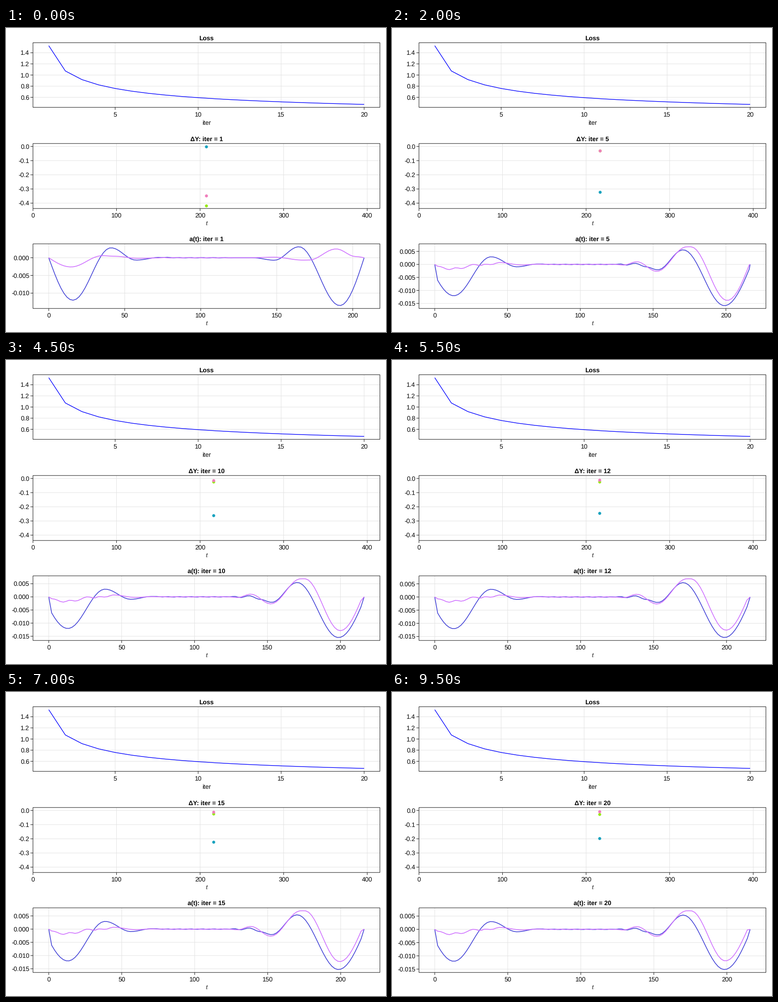
Write a matplotlib script that moves like this. It is 837 px wide and 669 px high and loops after 10 s.

```python
import numpy as np
import matplotlib.pyplot as plt
from matplotlib.animation import FuncAnimation

W, H, DPI = 837, 669, 64
PX = 72 / DPI                      # points per pixel
LEFT, RIGHT, MID = 59.4, 823.6, 441.5
SPAN = 694.6                       # width of a control curve on the stage
FONT = 13.9
ITERS = np.arange(1, 21)
BLUE, VIOLET = "#4848d8", "#d074ff"
TEAL, PINK, GREEN = "#18a2be", "#f07fbc", "#98e818"

plt.rcParams["font.family"] = ["Liberation Sans", "DejaVu Sans"]
plt.rcParams["mathtext.fontset"] = "cm"
plt.rcParams["text.hinting"] = "none"
plt.rcParams["path.snap"] = False

LOSS = np.where(ITERS == 1, 1.527, 0.143 + 1.2704 * ITERS ** -0.45)


def progress(k):
    """0 at iteration 5, 1 at iteration 20, slowing down like a logarithm."""
    w = np.log(k / 5) / np.log(4)
    return w if w > 0 else 0.4 * w


def duration(k):
    return 207.5 if k == 1 else 216.65 - 0.72 * progress(k)


def errors(k):
    """Coloured end-point errors, back to front."""
    if k == 1:
        teal, green, pink = 0, -.417, -.346
    else:
        teal = -.322 + .0895 * np.log(k / 5)
        green = -.013 - .0007 * k - .0125 * np.exp((5 - k) / 3)
        pink = -.0085 - .0205 * np.exp((5 - k) / 3.7)
    return (TEAL, teal), (GREEN, green), (PINK, pink)


def swing(x, keys, start=0, end=SPAN):
    """Cosine easing from extreme to extreme, crossing zero at start and end."""
    (x0, v0), (x1, v1) = keys[0], keys[-1]
    keys = [(2 * start - x0, -v0), *keys, (2 * end - x1, -v1)]
    kx, kv = np.array(keys, float).T
    i = np.clip(np.searchsorted(kx, x, side="right") - 1, 0, len(kx) - 2)
    s = (x - kx[i]) / (kx[i + 1] - kx[i])
    v = kv[i] + (kv[i + 1] - kv[i]) * (1 - np.cos(np.pi * s)) / 2
    v[x > end] = 0
    v[0] = v[-1] = 0
    return v


def ripple(x, size, phase):
    window = np.clip((x - 225) / 30, 0, 1) * np.clip((410 - x) / 30, 0, 1)
    return size * window * np.sin(2 * np.pi * x / 25.5 + phase)


def first_controls(x):
    blue = swing(x, [(53, -12), (137, 2.81), (192, -.67), (245, .1), (290, 0),
                     (450, 0), (497, -.7), (551, 3.11), (641, -13.52)])
    violet = swing(x, [(49, -2.6), (118, .58), (146, .42), (196, -.16), (256, 0),
                       (440, 0), (496, .16), (560, -.67), (573, -.65),
                       (633, 2.49), (676, .33)])
    return blue + ripple(x, .05, 0), violet + ripple(x, .06, 2)


def later_controls(x, w):
    blue = swing(x, [(42, -12.05), (124, 2.93), (181, -.93), (226, .15), (260, 0),
                     (395, 0), (409, .18), (422, -.28), (441, .45), (465, -.93),
                     (491, -2.09), (547, 5.6 - .22 * w), (638, -15.86 + .7 * w)],
                 start=-11.8, end=697)
    violet = swing(x, [(10, -.82), (32, -2), (47, -1.26), (58, -1.6), (86, .02),
                       (100, -.46), (111, .1), (124, -.08), (142, .72), (192, -.22),
                       (226, .08), (260, 0), (395, 0), (416, -.25), (445, 1.03),
                       (489, -2.67), (555, 6.77 + .22 * w), (564, 6.77 + .22 * w),
                       (644 - 4 * w, -13.85 + 1.95 * w)],
                   end=693 - 4 * w)
    return blue + ripple(x, .09, 0), violet + ripple(x, .09, 2.5)


def controls(k):
    """Sample times and the two control curves of one iteration."""
    end = duration(k)
    t = np.append(np.arange(0, end - 0.3, 2), end)
    x = t / end * SPAN
    curves = first_controls(x) if k == 1 else later_controls(x, progress(k))
    return t, [c / 1000 for c in curves]


def padded(*arrays):
    lo, hi = min(map(np.min, arrays)), max(map(np.max, arrays))
    pad = 0.05 * (hi - lo)
    return lo - pad, hi + pad


class Panel:
    """A framed plot area placed by pixels."""

    def __init__(self, top, bottom, xlim, ylim):
        self.top, self.bottom, self.xlim, self.ylim = top, bottom, xlim, ylim

    def x(self, v):
        a, b = self.xlim
        return LEFT + (np.asarray(v) - a) / (b - a) * (RIGHT - LEFT)

    def y(self, v):
        a, b = self.ylim
        return self.bottom - (np.asarray(v) - a) / (b - a) * (self.bottom - self.top)

    def frame(self, title):
        line([LEFT, RIGHT, RIGHT, LEFT, LEFT],
             [self.top, self.top, self.bottom, self.bottom, self.top], "#111111", 1, z=4)
        text(MID, self.top - 5.8, title, weight="bold")

    def xticks(self, values):
        for v in values:
            x = float(self.x(v))
            line([x, x], [self.top, self.bottom], "#e2e2e2", 1, z=1)
            line([x, x], [self.bottom, self.bottom + 5.5], "#111111", 1, z=4)
            text(x, self.bottom + 20.1, f"{v}")

    def yticks(self, values, digits):
        for v in values:
            y = float(self.y(v))
            line([LEFT, RIGHT], [y, y], "#e2e2e2", 1, z=1)
            line([LEFT - 5.5, LEFT], [y, y], "#111111", 1, z=4)
            text(51.3, y + 4.9, f"{v:.{digits}f}", ha="right")

    def plot(self, xs, ys, color, width):
        line(self.x(xs), self.y(ys), color, width, z=3)


fig = plt.figure(figsize=(W / DPI, H / DPI), dpi=DPI, facecolor="white")
ax = fig.add_axes([0, 0, 1, 1])
ax.set(xlim=(0, W), ylim=(H, 0))
ax.axis("off")
drawn = []


def line(xs, ys, color, width, z):
    drawn.extend(ax.plot(xs, ys, color=color, lw=width * PX, zorder=z, snap=False,
                         solid_joinstyle="miter", solid_capstyle="butt"))


def text(x, y, label, ha="center", weight="normal", size=FONT):
    drawn.append(ax.text(x, y, label, ha=ha, va="baseline", weight=weight,
                         size=size * PX, color="black"))


def draw_loss():
    panel = Panel(32.4, 174.6, padded(ITERS), padded(LOSS))
    panel.xticks(range(5, 21, 5))
    panel.yticks([.6, .8, 1.0, 1.2, 1.4], 1)
    panel.plot(ITERS, LOSS, "#0000ff", 1.4)
    panel.frame("Loss")
    text(MID, 213.3, "iter")


def draw_errors(k):
    panel = Panel(254.2, 397.2, (0, 415.2), padded([-.417, 0]))
    panel.xticks(range(0, 401, 100))
    panel.yticks([0.0, -.1, -.2, -.3, -.4], 1)
    for z, (color, value) in enumerate(errors(k), start=5):
        drawn.extend(ax.plot(panel.x(duration(k)), panel.y(value), "o",
                             ms=6.6 * PX, mew=0, color=color, zorder=z))
    panel.frame(f"ΔY: iter = {k}")
    text(MID + 1, 434, "$t$", size=14.5)


def draw_controls(k):
    t, curves = controls(k)
    panel = Panel(475, 617.2, padded(t), padded(*curves))
    panel.xticks(range(0, 201, 50))
    lo, hi = panel.ylim
    panel.yticks([i * .005 for i in range(-4, 3) if lo < i * .005 < hi], 3)
    for curve, color in zip(curves, (BLUE, VIOLET)):
        panel.plot(t, curve, color, 1.7)
    panel.frame(f"a(t): iter = {k}")
    text(MID + 1, 654, "$t$", size=14.5)


def update(frame):
    while drawn:
        drawn.pop().remove()
    draw_loss()
    draw_errors(frame + 1)
    draw_controls(frame + 1)
    return []


anim = FuncAnimation(fig, update, frames=len(ITERS), interval=500,
                     init_func=lambda: [], repeat=True, repeat_delay=0, blit=False)
plt.show()
```
